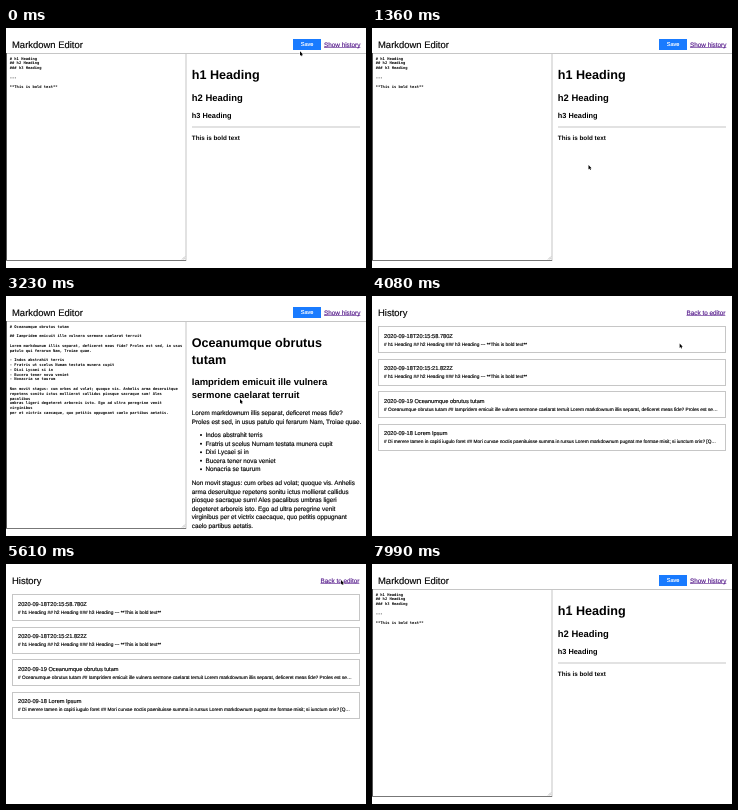
Recreate the animation shown at these times as an HTML page with a canvas. Size 360x240 px, loop 8330 ms.

```html
<!DOCTYPE html>
<html lang="en">
<head>
<meta charset="utf-8">
<title>Markdown Editor</title>
<style>
html, body { margin: 0; width: 100%; height: 100%; overflow: hidden; background: #fff; }
canvas { display: block; width: 360px; height: 240px; }
</style>
</head>
<body>
<canvas id="stage"></canvas>
<script>
const canvas = document.getElementById('stage');
const ctx = canvas.getContext('2d');
const dpr = window.devicePixelRatio || 1;
canvas.width = 360 * dpr;
canvas.height = 240 * dpr;

const LOOP = 8330, STEP = 170;
const SANS = '"Liberation Sans", Arial, sans-serif';
const MONO = '"DejaVu Sans Mono", monospace';
const BLUE = '#197bff', INK = '#000', VISITED = '#551a8b', RULE = '#c6c6c6';

// size, line height, weight of each block style
const STYLES = {
  h1: [12.6, 17, 'bold'],
  h2: [9.45, 13, 'bold'],
  h3: [7.37, 10, 'bold'],
  b: [6.3, 8.5, 'bold'],
  p: [6.3, 8.5, 'normal'],
  li: [6.3, 8.55, 'normal']
};

const headings = {
  source: `# h1 Heading
## h2 Heading
### h3 Heading

---

**This is bold text**`,
  blocks: [
    ['h1', 51.4, 'h1 Heading'],
    ['h2', 72.6, 'h2 Heading'],
    ['h3', 90, 'h3 Heading'],
    ['hr', 98.5],
    ['b', 112, 'This is bold text']
  ]
};

const ocean = {
  source: `# Oceanumque obrutus tutam

## Iampridem emicuit ille vulnera sermone caelarat territ

Lorem markdownum illis separat, deficeret meas fide? Proles est sed, in usus
patulo qui ferarum Nam, Troiae quae.

- Indos abstrahit terris
- Fratris ut scelus Numam testata munera cupit
- Dixi Lycaei si in
- Bucera tener nova veniet
- Nonacria se taurum

Non movit stagus: cum orbes ad volat; quoque vis. Anhelis arma deseruitque
repetens sonitu ictus mollierat callidus piosque sacraque sum! Ales
pacalibus
umbras ligeri degeteret arboreis isto. Ego ad ultra peregrine venit
virginibus
per et victrix caecaque, quo petitis oppugnant caelo partibus aetatis.`.replace('territ\n', 'terruit\n'),
  blocks: [
    ['h1', 51.4, 'Oceanumque obrutus\ntutam'],
    ['h2', 89.2, 'Iampridem emicuit ille vulnera\nsermone caelarat terruit'],
    ['p', 119.2, 'Lorem markdownum illis separat, deficeret meas fide?\nProles est sed, in usus patulo qui ferarum Nam, Troiae quae.'],
    ['li', 141.2, 'Indos abstrahit terris\nFratris ut scelus Numam testata munera cupit\nDixi Lycaei si in\nBucera tener nova veniet\nNonacria se taurum'],
    ['p', 189.2, `Non movit stagus: cum orbes ad volat; quoque vis. Anhelis
arma deseruitque repetens sonitu ictus mollierat callidus
piosque sacraque sum! Ales pacalibus umbras ligeri
degeteret arboreis isto. Ego ad ultra peregrine venit
virginibus per et victrix caecaque, quo petitis oppugnant
caelo partibus aetatis.`]
  ]
};

const lorem = {
  source: `# Di merere tamen in capiti iugulo foret

## Mori curvae noctis paenituisse summa in rursus

Lorem markdownum pugnat me formae misit; si iunctum oris? Quae tibi manus
et pariter nomen, silvas per undas.

- Vultus erat pectore
- Nec tamen auras nubila ferunt
- Tellus et ignes
- Terga dabant ventis

Arma tulit sidus: cum terras ad mare; quoque lux. Carmina ripas tenebant
frondes sonitu motus et liquidas aquas. Illa quidem silvis dedit umbram.`,
  blocks: [
    ['h1', 51.4, 'Di merere tamen in capiti\niugulo foret'],
    ['h2', 89.2, 'Mori curvae noctis paenituisse\nsumma in rursus'],
    ['p', 119.2, 'Lorem markdownum pugnat me formae misit; si iunctum\noris? Quae tibi manus et pariter nomen, silvas per undas.'],
    ['li', 141.2, 'Vultus erat pectore\nNec tamen auras nubila ferunt\nTellus et ignes\nTerga dabant ventis'],
    ['p', 180.6, `Arma tulit sidus: cum terras ad mare; quoque lux.
Carmina ripas tenebant frondes sonitu motus et liquidas
aquas. Illa quidem silvis dedit umbram.`]
  ]
};

const STAMP = '2020-09-18T20:15:58.780Z';
const SUMMARY = '# h1 Heading ## h2 Heading ### h3 Heading --- **This is bold text**';
const entries = [
  [STAMP, SUMMARY],
  ['2020-09-18T20:15:21.822Z', SUMMARY],
  ['2020-09-19 Oceanumque obrutus tutam', '# Oceanumque obrutus tutam ## Iampridem emicuit ille vulnera sermone caelarat terruit Lorem markdownum illis separat, deficeret meas fide? Proles est se…'],
  ['2020-09-18 Lorem Ipsum', '# Di merere tamen in capiti iugulo foret ## Mori curvae noctis paenituisse summa in rursus Lorem markdownum pugnat me formae misit; si iunctum oris? [Q…']
];

const scenes = [
  [0, () => editor(headings)],
  [170, () => editor(headings, true)],
  [340, () => { editor(headings, true); dialog(); }],
  [1360, () => editor(headings)],
  [2040, () => history()],
  [2890, () => history(2)],
  [3060, () => editor(ocean)],
  [3910, () => history()],
  [4590, () => history(3)],
  [4760, () => editor(lorem)],
  [5610, () => history()],
  [6630, () => history(0)],
  [6800, () => editor(headings)]
];

// time, x, y of the pointer tip
const path = [
  [0, 294, 23.3], [340, 297.5, 18], [510, 297.5, 18], [1020, 216.5, 137],
  [1360, 216.5, 137], [1870, 335, 16], [2040, 335, 16], [2720, 234, 103],
  [3230, 234, 103], [3740, 335, 16], [3910, 335, 16], [4420, 229.5, 137.5],
  [4930, 229.5, 137.5], [5440, 335, 16], [5610, 335, 16], [6290, 197.5, 43.5],
  [LOOP, 197.5, 43.5]
];

// Type is set large and scaled down so advances stay fractional;
// a hairline stroke gives it the heavier screen rendering.
function text(str, x, y, size, color = INK, weight = 'normal', family = SANS) {
  ctx.save();
  ctx.translate(x, y);
  ctx.scale(0.25, 0.25);
  ctx.font = `${weight} ${size * 4}px ${family}`;
  ctx.textRendering = 'geometricPrecision';
  ctx.fillStyle = ctx.strokeStyle = color;
  ctx.lineWidth = 0.6;
  ctx.lineJoin = 'round';
  ctx.fillText(str, 0, 0);
  if (weight === 'normal') ctx.strokeText(str, 0, 0);
  const width = ctx.measureText(str).width / 4;
  ctx.restore();
  return width;
}

function rect(x, y, w, h, color) {
  ctx.fillStyle = color;
  ctx.fillRect(x, y, w, h);
}

function frame(x, y, w, h, color) {
  ctx.strokeStyle = color;
  ctx.lineWidth = 1;
  ctx.strokeRect(x + 0.5, y + 0.5, w - 1, h - 1);
}

function link(str, x) {
  const width = text(str, x, 18.8, 6.35, VISITED);
  rect(x, 19.4, width, 0.6, VISITED);
}

function saveButton(x, y) {
  rect(x, y, 28, 11, BLUE);
  text('Save', x + 7.8, y + 7.4, 5.55, '#fff');
}

function block([style, y, content]) {
  if (style === 'hr') return rect(186, y, 168, 1, RULE);
  const [size, leading, weight] = STYLES[style];
  const bullet = style === 'li';
  content.split('\n').forEach((line, i) => {
    const base = y + i * leading;
    text(line, bullet ? 199.5 : 185.8, base, size, INK, weight);
    if (bullet) {
      ctx.beginPath();
      ctx.arc(195, base - 2.1, 1, 0, 7);
      ctx.fillStyle = INK;
      ctx.fill();
    }
  });
}

function editor(doc, focused) {
  text('Markdown Editor', 6, 19.8, 9.45);
  saveButton(287, 11);
  if (focused) frame(287, 11, 28, 11, '#0c55b8');
  link('Show history', 318);

  rect(0, 25, 360, 1, RULE);
  rect(179.5, 25, 1, 208, RULE);
  rect(0, 25, 1, 208, '#555');
  rect(0, 232, 180, 1, '#777');
  ctx.strokeStyle = '#888';
  ctx.lineWidth = 0.5;
  ctx.beginPath();
  ctx.moveTo(176, 231.5);
  ctx.lineTo(179, 228.5);
  ctx.moveTo(177.7, 231.5);
  ctx.lineTo(179, 230.2);
  ctx.stroke();

  ctx.save();
  ctx.beginPath();
  ctx.rect(0, 25, 360, 208);
  ctx.clip();
  doc.source.split('\n').forEach((line, i) => text(line, 3.8, 31.6 + i * 4.8, 3.77, INK, 'bold', MONO));
  doc.blocks.forEach(block);
  ctx.restore();
}

function dialog() {
  rect(0, 8, 360, 225, 'rgba(0,0,0,.17)');
  rect(90, 85, 180, 71.5, '#fff');
  text('Please input the title and click Save button.', 96, 102.3, 6.3);
  frame(96, 110, 163, 12.5, '#777');
  text(STAMP, 99, 117.6, 3.5);
  frame(134, 134, 30, 11, '#999');
  text('Cancel', 140.6, 141.5, 5.5, '#555');
  saveButton(197, 134);
}

function history(active = -1) {
  text('History', 6, 19.8, 9.45);
  link('Back to editor', 314.5);
  entries.forEach(([title, summary], i) => {
    const y = 30 + i * 32.5;
    frame(6, Math.round(y), 348, 27, i === active ? '#5585d8' : RULE);
    text(title, 12, y + 11.5, 5.65);
    text(summary, 12, y + 19.9, 4.75);
  });
}

function pointer(t) {
  const i = path.findIndex(p => p[0] > t);
  const [t0, x0, y0] = path[i - 1], [t1, x1, y1] = path[i];
  const k = (t - t0) / (t1 - t0), ease = k * k * (3 - 2 * k);
  ctx.save();
  ctx.translate(x0 + (x1 - x0) * ease, y0 + (y1 - y0) * ease);
  ctx.beginPath();
  if (t < 6800) {
    ctx.moveTo(0, 0);
    ctx.lineTo(0, 4.4);
    ctx.lineTo(1, 3.5);
    ctx.lineTo(1.7, 5);
    ctx.lineTo(2.4, 4.7);
    ctx.lineTo(1.8, 3.3);
    ctx.lineTo(3.1, 3.2);
    ctx.closePath();
    ctx.strokeStyle = '#fff';
    ctx.lineWidth = 0.8;
    ctx.stroke();
    ctx.fillStyle = '#000';
    ctx.fill();
  } else {
    ctx.moveTo(-1.2, -1.5);
    ctx.lineTo(1.2, -1.5);
    ctx.moveTo(0, -1.5);
    ctx.lineTo(0, 5.5);
    ctx.moveTo(-1.2, 5.5);
    ctx.lineTo(1.2, 5.5);
    ctx.strokeStyle = '#333';
    ctx.lineWidth = 0.7;
    ctx.stroke();
  }
  ctx.restore();
}

function draw(now) {
  const t = Math.floor((now - start) % LOOP / STEP) * STEP;
  ctx.setTransform(dpr, 0, 0, dpr, 0, 0);
  rect(0, 0, 360, 240, '#fff');
  scenes.filter(s => s[0] <= t).pop()[1]();
  pointer(t);
}

function tick() {
  draw(performance.now());
  requestAnimationFrame(tick);
}

const start = performance.now();
tick();
</script>
</body>
</html>
```
